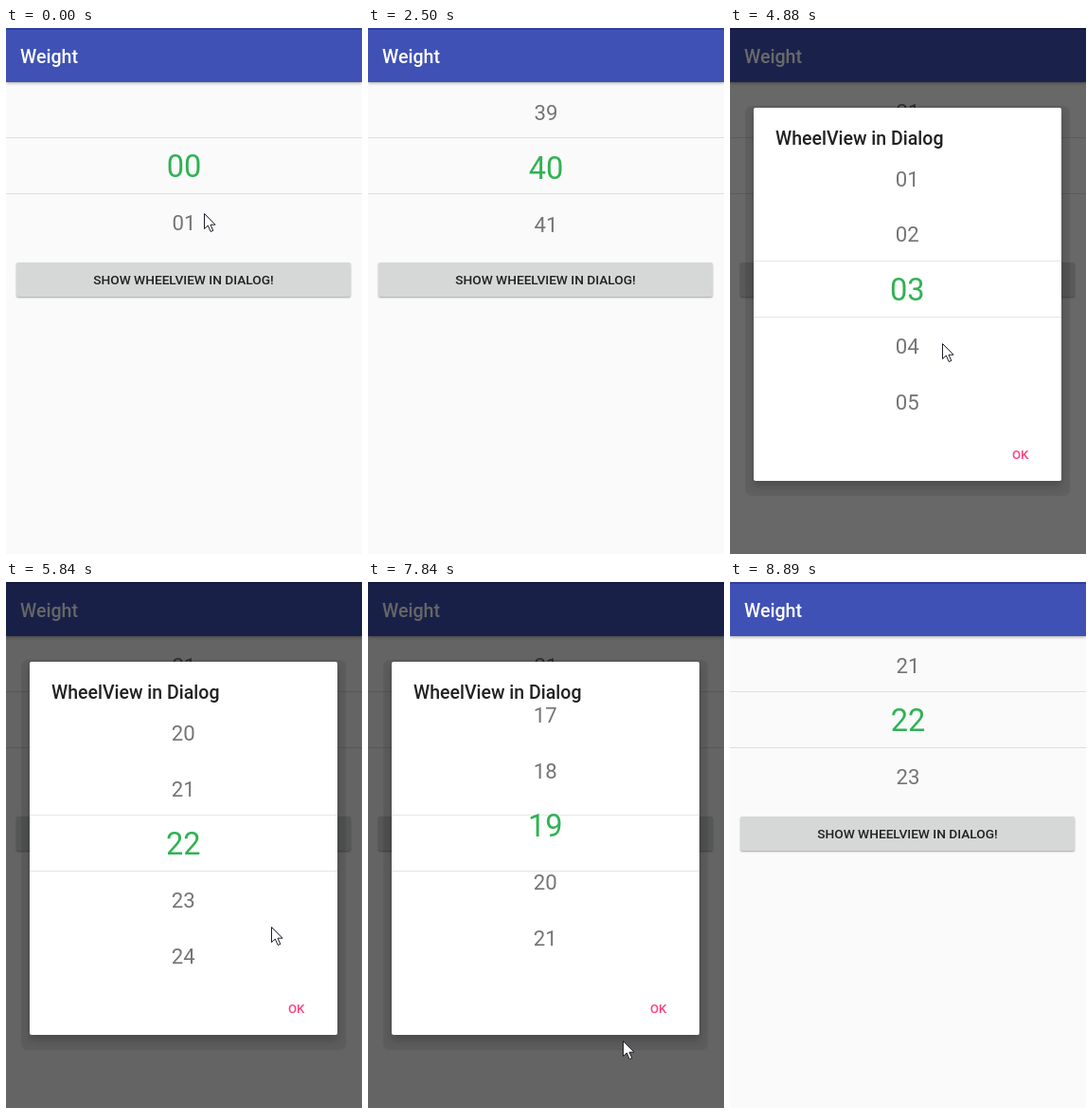
These frames come from a looping animation (376x554 px, 9 s). An HTML page:

```html
<!DOCTYPE html>
<html lang="en">
<head>
<meta charset="utf-8">
<title>Wheel picker</title>
<style>
html, body { margin: 0; width: 100%; height: 100%; overflow: hidden; }
body { position: relative; background: #fafafa; font: 500 19.6px/24px Roboto, sans-serif; }
div, svg { position: absolute; white-space: nowrap; }
#bar { left: 0; top: 0; width: 376px; height: 56.5px; box-sizing: border-box; background: #3f51b5;
  border-top: 2px solid #303f9f; box-shadow: 0 1px 3px rgba(0,0,0,.35); color: #fff; }
#bar div { left: 15px; top: 17px; }
#button { left: 11px; top: 247px; width: 353px; height: 36px; border-radius: 2px; background: #d6d7d7;
  box-shadow: 0 1px 2px rgba(0,0,0,.35); color: #212121; font-size: 13.7px; line-height: 36px; text-align: center; }
#dim { left: 0; top: 0; width: 376px; height: 554px; background: #000; }
#dialog { left: 24.5px; top: 83.5px; width: 325.5px; height: 393px; border-radius: 2px; background: #fff;
  box-shadow: 0 7px 1px 9px rgba(0,0,0,.08), 0 5px 8px rgba(0,0,0,.2); color: #212121; }
#title { left: 23.5px; top: 21px; font-size: 19.5px; }
#ok { left: 273.5px; top: 354px; color: #ff4081; font-size: 13.2px; }
.wheel { overflow: hidden; }
#main { left: 0; top: 56px; width: 376px; height: 178px; }
#pick { left: 0; top: 44.5px; width: 325.5px; height: 293.5px; }
.line { left: 0; width: 100%; height: 1px; background: #dedede; }
#pick .line { background: #e6e6e6; }
.strip { left: 0; top: 0; width: 100%; }
.strip div { width: 100%; height: 58.7px; line-height: 58.7px; text-align: center;
  font-size: 22.2px; font-weight: 400; color: #757575; }
.strip .on { font-size: 32.6px; color: #2fb254; }
#cursor { left: 0; top: 0; }
</style>
</head>
<body>
<div class="wheel" id="main"></div>
<div id="bar"><div>Weight</div></div>
<div id="button">SHOW WHEELVIEW IN DIALOG!</div>
<div id="dim"></div>
<div id="dialog">
  <div id="title">WheelView in Dialog</div>
  <div class="wheel" id="pick"></div>
  <div id="ok">OK</div>
</div>
<svg id="cursor" width="14" height="22">
  <path d="M.5 .5V16.5L4.300 13L7.200 19.500L9.800 18.400L7 12.200H12Z" fill="#fff" stroke="#1c1c28"/>
</svg>
<script>
const LOOP = 9000, ROW = 58.7, STEP = 58, OPEN = 4590, CLOSE = 8650, CLOSED = 8890;
const $ = id => document.getElementById(id);
const clamp = u => Math.max(0, Math.min(1, u));

// Each move eases a wheel to a value while the pointer goes to a point, bowed out by an arc
const move = (start, end, wheel, value, point, arc = [0, 0]) => ({ start, end, wheel, value, point, arc });
const moves = [
  move(310, 920, 'main', 8, [226, 214], [14, -146]),
  move(1100, 1970, 'main', 22, [262, 205], [56, -207]),
  move(2030, 2890, 'main', 42, [255, 80], [32, -130]),
  move(3010, 3900, 'main', 22.64, [222, 345], [-85, 185]),
  move(3960, 4420, 'main', 22, [212, 268], [-16, -5]),
  move(OPEN, 5480, 'pick', 3, [245, 130], [1, 127]),
  move(5540, 6420, 'pick', 30, [257, 143], [36, 264]),
  move(6470, 7020, 'pick', 36, [257, 143]),
  move(7200, 8070, 'pick', 19, [273, 455], [0, 150]),
  move(8120, 8410, 'pick', 19, [311, 450]),
  move(CLOSE, CLOSED, 'pick', 19, [336, 498], [27, 51])
];

// Time of the latest picture change: moves advance in even steps and hold in between
function held(t) {
  const m = moves.findLast(m => m.start <= t);
  if (!m) return 0;
  const span = m.end - m.start, step = span / Math.round(span / STEP);
  return Math.min(m.end, m.start + Math.floor((t - m.start + 8) / step) * step);
}

function poseAt(t) {
  const pose = { main: 0, pick: 3, x: 209, y: 195 };
  for (const { start, end, wheel, value, point, arc } of moves) {
    const u = clamp((t - start) / (end - start)), bow = Math.sin(Math.PI * u);
    pose[wheel] += (value - pose[wheel]) * (1 - (1 - u) ** 3);
    pose.x += (point[0] - pose.x) * u + arc[0] * bow;
    pose.y += (point[1] - pose.y) * u + arc[1] * bow;
    if (u < 1) break;
  }
  return pose;
}

function addDiv(parent, className, top) {
  const div = document.createElement('div');
  div.className = className;
  div.style.top = top + 'px';
  parent.append(div);
  return div;
}

function makeWheel(id, center, line) {
  addDiv($(id), 'line', line);
  addDiv($(id), 'line', line + ROW);
  const strip = addDiv($(id), 'strip', 0);
  const items = Array.from({ length: 50 }, (_, i) => {
    const item = addDiv(strip, '', i * ROW);
    item.textContent = String(i).padStart(2, '0');
    return item;
  });
  return pos => {
    strip.style.transform = `translateY(${center - ROW / 2 - pos * ROW}px)`;
    items.forEach((item, i) => item.classList.toggle('on', i === Math.round(pos)));
  };
}

const setMain = makeWheel('main', 90.3, 59);
const setPick = makeWheel('pick', 148.3, 117);

function draw(now) {
  const t = held(now % LOOP), pose = poseAt(t);
  const closing = clamp((t - CLOSE) / (CLOSED - CLOSE));
  setMain(pose.main);
  setPick(pose.pick);
  $('dim').style.opacity = .6 * clamp((t - OPEN) / 305) * (1 - closing ** 2);
  $('dialog').style.opacity = clamp((t - OPEN) / 190) * (1 - closing);
  const hidden = t > 2450 && t < 2540 || closing === 1;
  $('cursor').style.opacity = hidden ? 0 : 1;
  $('cursor').style.transform = `translate(${Math.round(pose.x)}px, ${Math.round(pose.y)}px)`;
}

const start = performance.now();
function tick() {
  draw(performance.now() - start);
  requestAnimationFrame(tick);
}
tick();
</script>
</body>
</html>
```
